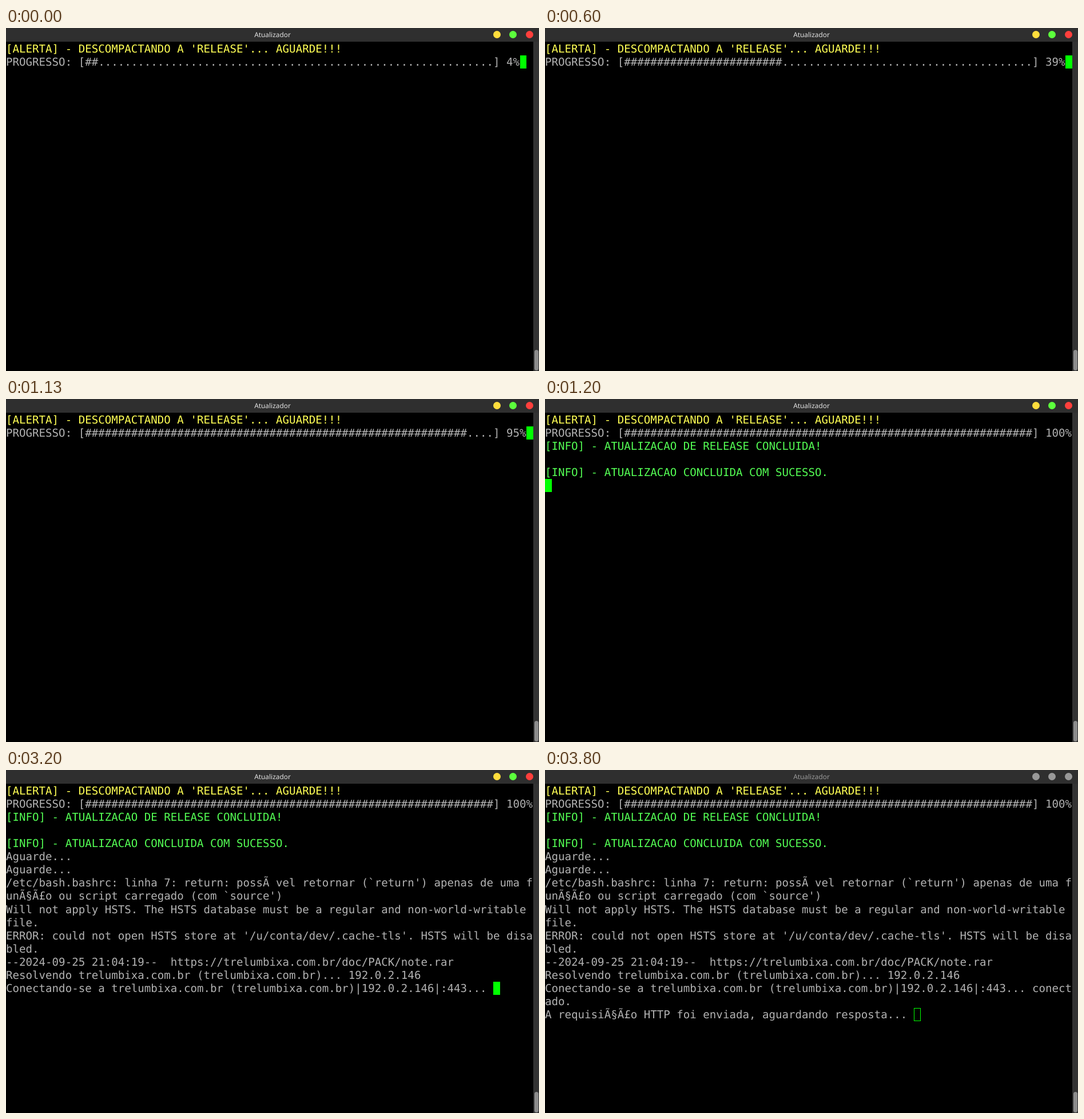
Animation of 932x601 px, one loop 3.87 s. Source, as an HTML page:

```html
<!DOCTYPE html>
<html lang="pt-BR">
<head>
<meta charset="utf-8">
<style>
  html, body { margin: 0; width: 100%; height: 100%; overflow: hidden; background: #000; }
  #stage { position: relative; width: 932px; height: 601px; overflow: hidden; text-rendering: geometricPrecision; }
  #stage * { position: absolute; box-sizing: border-box; }
  #bar { left: 0; top: 0; width: 932px; height: 24px; background: #2f2f2f; }
  #title { width: 100%; text-align: center; color: #e2e2e2; font: 500 11.9px/24px "Noto Sans", sans-serif; }
  #bar i { top: 5px; width: 13px; height: 13px; border-radius: 50%; }
  #bar.blur #title { color: #9a9a9a; }
  #bar.blur i { background: #999 !important; }
  #track { left: 922px; top: 24px; width: 10px; height: 577px; background: #333; }
  #thumb { left: 2px; top: 540px; width: 7px; height: 36px; border-radius: 4px; background: #8c8c8c; }
  #screen { left: 0; top: 25px; margin: 0; color: #b2b2b2; font: 19.135px/23.06px "DejaVu Sans Mono", monospace; }
  #screen div { left: 0; white-space: pre; }
  #cursor { width: 11.52px; height: 23.06px; background: #0f0; }
  #cursor.blur { background: none; border: 1px solid #0f0; }
</style>
</head>
<body>
<div id="stage">
  <div id="bar">
    <div id="title">Atualizador</div>
    <i style="left:852px;background:#ffdd3c"></i>
    <i style="left:880px;background:#5cff3c"></i>
    <i style="left:909px;background:#ff3f3c"></i>
  </div>
  <div id="track"><div id="thumb"></div></div>
  <div id="screen"></div>
  <div id="cursor"></div>
</div>
<script>
const LOOP = 3870, COL = 11.52, ROW = 23.06, TOP = 25, CELLS = 62;
const YELLOW = '#ffff54', GREEN = '#54ff54';
const HOST = 'trelumbixa.com.br', IP = '192.0.2.146';
const $ = id => document.getElementById(id);
const bar = $('bar'), screen_ = $('screen'), cursor = $('cursor');

// Terminal output by the time it is printed; a trailing newline moves the cursor down.
const output = [
  [1200, '\n[INFO] - ATUALIZACAO DE RELEASE CONCLUIDA!\n\n[INFO] - ATUALIZACAO CONCLUIDA COM SUCESSO.\n'],
  [2270, 'Aguarde...\n'],
  [3200, `Aguarde...
/etc/bash.bashrc: linha 7: return: possÃ vel retornar (\`return') apenas de uma f
unÃ§Ã£o ou script carregado (com \`source')
Will not apply HSTS. The HSTS database must be a regular and non-world-writable
file.
ERROR: could not open HSTS store at '/u/conta/dev/.cache-tls'. HSTS will be disa
bled.
--2024-09-25 21:04:19--  https://${HOST}/doc/PACK/note.rar
Resolvendo ${HOST} (${HOST})... ${IP}
Conectando-se a ${HOST} (${HOST})|${IP}|:443... `],
  [3400, 'conect\nado.\n'],
  [3730, 'A requisiÃ§Ã£o HTTP foi enviada, aguardando resposta... ']
];

// The bar advances 15 times a second, twice as fast after 39%.
function percent(t) {
  let tick = 0;
  while (tick < 18 && Math.round((tick + 1) * 20 / 3) * 10 <= t) tick++;
  if (tick > 17) return 100;
  return tick < 9 ? Math.floor(4 + 3.5 * tick) : 39 + 7 * (tick - 9);
}

function textAt(t) {
  const p = percent(t), done = Math.floor(CELLS * p / 100);
  const progress = `PROGRESSO: [${'#'.repeat(done).padEnd(CELLS, '.')}] ${p}%`;
  return "[ALERTA] - DESCOMPACTANDO A 'RELEASE'... AGUARDE!!!\n" + progress +
    output.filter(([time]) => t >= time).map(([, text]) => text).join('');
}

const colorOf = line =>
  line.startsWith('[ALERTA]') ? YELLOW : line.startsWith('[INFO]') ? GREEN : '';

let shown = '';
function draw(now) {
  const t = now % LOOP, text = textAt(t), blurred = t >= 3800;
  if (text !== shown) {
    const lines = text.split('\n'), last = lines.length - 1;
    screen_.replaceChildren(...lines.map((line, row) => {
      const div = document.createElement('div');
      div.textContent = line;
      div.style.color = colorOf(line);
      div.style.top = row * ROW + 'px';
      return div;
    }));
    cursor.style.left = lines[last].length * COL + 'px';
    cursor.style.top = TOP + last * ROW + 'px';
    shown = text;
  }
  bar.classList.toggle('blur', blurred);
  cursor.classList.toggle('blur', blurred);
}

const start = performance.now();
function frame() {
  draw(performance.now() - start);
  requestAnimationFrame(frame);
}
frame();
</script>
</body>
</html>
```
